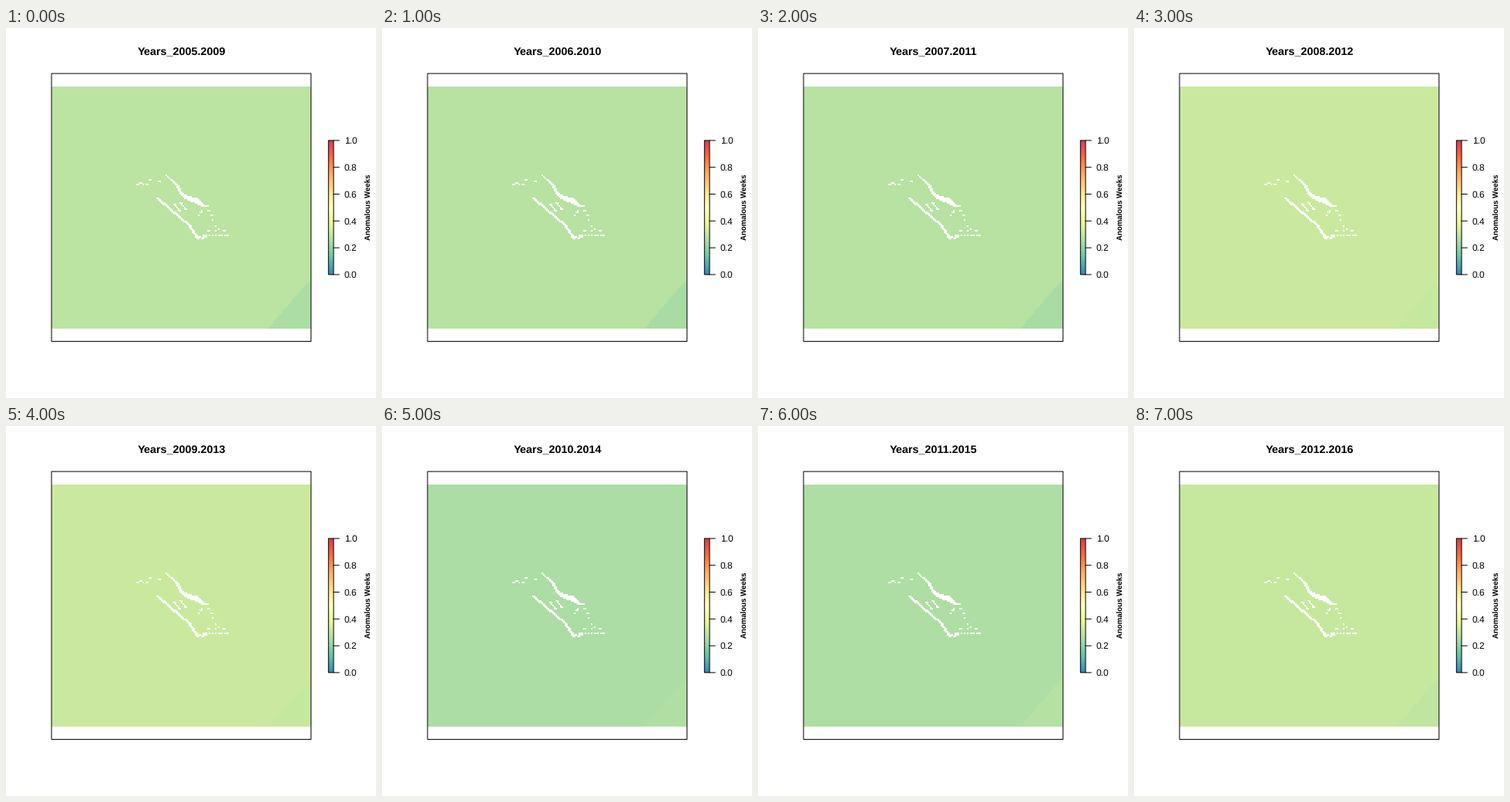
Write a matplotlib script that moves like this. It is 480 by 480 pixels and loops after 8000 ms.

```python
import numpy as np
import matplotlib.pyplot as plt
from matplotlib.animation import FuncAnimation
from matplotlib.colors import LinearSegmentedColormap
from matplotlib.patches import Rectangle

SIZE, DPI = 480, 100
LEFT, RIGHT, TOP, BOTTOM = 59, 396, 76, 390
CELL = 2
BAR_X, BAR_W, BAR_TOP, BAR_H = 418.3, 6.7, 145.9, 174

plt.rcParams["font.family"] = "Liberation Sans"
plt.rcParams["text.hinting"] = "none"

SPECTRAL = LinearSegmentedColormap.from_list("spectral", [
    "#3288bd", "#66c2a5", "#abdda4", "#e6f598", "#ffffbf",
    "#fee08b", "#fdae61", "#f46d43", "#d53e4f"], N=1024)

# share of anomalous weeks per period: main area, corner
MAIN = [0.284, 0.275, 0.275, 0.315, 0.315, 0.250, 0.256, 0.308]
CORNER = [0.250, 0.245, 0.245, 0.305, 0.305, 0.263, 0.271, 0.292]

cx, cy = np.meshgrid(np.arange(LEFT, RIGHT + 1, CELL) + CELL / 2,
                     np.arange(TOP, BOTTOM, CELL) + CELL / 2)


def to_pixels(cells):
    big = cells.repeat(CELL, 0).repeat(CELL, 1)
    return big[:BOTTOM - TOP, :RIGHT - LEFT]


def strip(y, left, right):
    """Cells between two edges, each a polyline over y."""
    return ((cy >= y[0]) & (cy <= y[-1])
            & (cx >= np.interp(cy, y, left))
            & (cx <= np.interp(cy, y, right)))


def dashes(rng, start, end, count):
    """Short loose dashes scattered along a line."""
    mask = np.zeros(cx.shape, bool)
    for x, y in np.linspace(start, end, count) + rng.uniform(-1, 1, (count, 2)):
        width = CELL * rng.integers(1, 3)
        mask |= (abs(cy - y) <= CELL / 2) & (abs(cx - x) <= width / 2)
    return mask


def build_coast():
    rng = np.random.default_rng(4)
    coast = strip([190, 203, 216, 221, 232],
                  [205, 219, 226, 231, 255],
                  [208, 223, 231, 248, 261])
    coast |= strip([221, 238, 256, 273],
                   [195, 214, 236, 247],
                   [199, 219, 240, 251])
    for x, y in [(217, 229), (225, 227)]:
        coast |= strip([y, y + 8], [x, x + 7], [x + 3, x + 10])
    for start, end, count in [
            ((171, 202), (182, 204), 4), ((187, 198), (200, 198), 2),
            ((250, 243), (254, 236), 3), ((261, 232), (275, 261), 6),
            ((252, 272), (260, 272), 4), ((262, 263), (282, 263), 3),
            ((256, 269), (288, 269), 9)]:
        coast |= dashes(rng, start, end, count)
    return to_pixels(coast)


def shade(value):
    return np.round(np.array(SPECTRAL(value))[..., :3] * 255).astype(np.uint8)


coast = build_coast()
corner = to_pixels(cx > 340 + (BOTTOM - cy) * 56 / 65)

canvas = np.full((SIZE, SIZE, 3), 255, np.uint8)
canvas[146:320, 418:425] = shade(np.linspace(1, 0, BAR_H))[:, None]


def paint(i):
    area = canvas[TOP:BOTTOM, LEFT:RIGHT]
    area[:] = shade(MAIN[i])
    area[corner] = shade(CORNER[i])
    area[coast] = 255
    return canvas


fig = plt.figure(figsize=(SIZE / DPI, SIZE / DPI), dpi=DPI, facecolor="white")
ax = fig.add_axes([0, 0, 1, 1])
ax.axis("off")
image = ax.imshow(paint(0), extent=(0, SIZE, SIZE, 0), aspect="auto",
                  interpolation="nearest")
ax.set_xlim(0, SIZE)
ax.set_ylim(SIZE, 0)

PX = 72 / DPI  # points per pixel


def label(x, y, text, size, **kw):
    return ax.text(x, y, text, fontsize=size * PX, color="black",
                   va="baseline", **kw)


def outline(x, y, w, h):
    ax.add_patch(Rectangle((x, y), w, h, fill=False, ec="black",
                           lw=PX, snap=False))


outline(59.04, 59.04, 336.7, 347.5)
outline(BAR_X, BAR_TOP, BAR_W, BAR_H)
for k in range(6):
    y = BAR_TOP + BAR_H * (1 - k / 5)
    ax.plot([BAR_X + BAR_W, 432.2], [y, y], color="black", lw=PX, snap=False)
    label(439, y + 4.1, f"{k / 5:.1f}", 12)

title = label(227.5, 35, "", 14.4, ha="center", weight="bold")
label(472.8, 232, "Anomalous Weeks", 9.6, ha="center", weight="bold",
      rotation=90, rotation_mode="anchor")


def update(i):
    image.set_data(paint(i))
    title.set_text(f"Years_{2005 + i}.{2009 + i}")
    return image, title


anim = FuncAnimation(fig, update, frames=len(MAIN), interval=1000,
                     repeat=True, repeat_delay=0)
plt.show()
```
